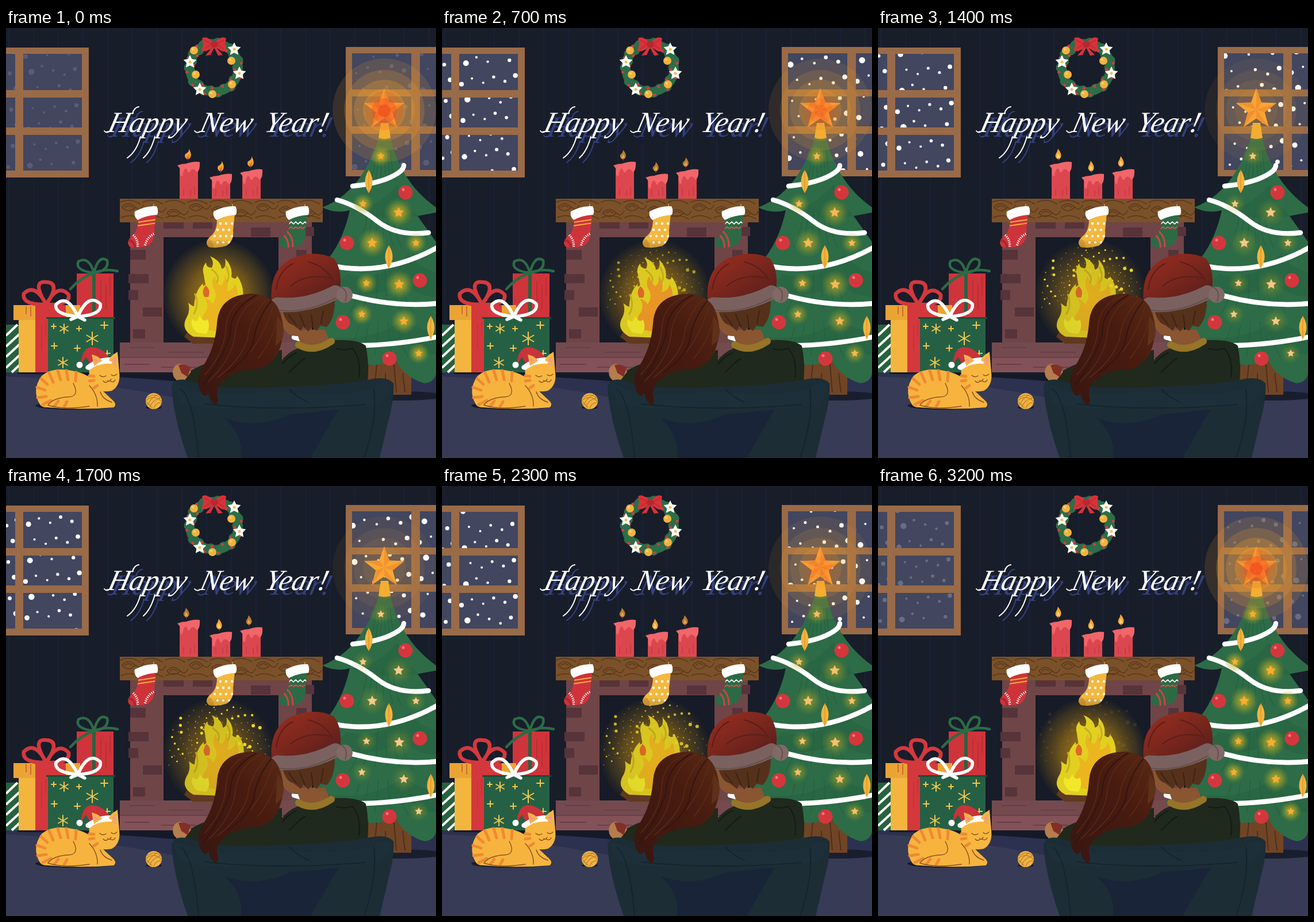
Animation, 748 px wide and 748 px high, one loop 3.3 s. Source, as an HTML page:

```html
<!DOCTYPE html>
<html lang="en">
<head>
<meta charset="utf-8">
<title>Happy New Year!</title>
<style>
html, body { margin: 0; width: 100%; height: 100%; overflow: hidden; background: #181d2a; }
svg { display: block; width: 100vw; height: 100vh; }
.line { fill: none; stroke-linecap: round; stroke-linejoin: round; }
text { font: italic 51px "Liberation Serif", "Noto Serif", serif; }
</style>
</head>
<body>
<svg viewBox="0 0 748 748">
<defs>
  <radialGradient id="fireGlow">
    <stop offset="0" stop-color="#e0a313" stop-opacity=".85"/>
    <stop offset=".55" stop-color="#a87a14" stop-opacity=".6"/>
    <stop offset=".85" stop-color="#74581a" stop-opacity=".35"/>
    <stop offset="1" stop-color="#594316" stop-opacity=".08"/>
  </radialGradient>
  <radialGradient id="starGlow">
    <stop offset="0" stop-color="#f5c21c" stop-opacity=".85"/>
    <stop offset=".5" stop-color="#c5b126" stop-opacity=".5"/>
    <stop offset="1" stop-color="#8a9433" stop-opacity="0"/>
  </radialGradient>
  <linearGradient id="hat" x1="0" y1="0" x2=".9" y2="1">
    <stop offset="0" stop-color="#9c2d20"/><stop offset=".5" stop-color="#7c271d"/><stop offset="1" stop-color="#541d1b"/>
  </linearGradient>
  <linearGradient id="hair" x1="1" y1="0" x2="0" y2="1">
    <stop offset="0" stop-color="#592a15"/><stop offset=".4" stop-color="#481b10"/><stop offset="1" stop-color="#381611"/>
  </linearGradient>
  <clipPath id="panes"><path d="M0 44H133V249H0zM601 43H748V248H601z"/></clipPath>
  <path id="sock" d="M230 329L261 324L258 352Q260 371 246 379Q230 384 216 381Q207 373 219 362Q231 353 230 329z"/>
  <path id="cuff" d="M224 319Q243 309 262 310Q266 317 263 325Q244 326 229 334Q222 328 224 319z" fill="#fff"/>
  <clipPath id="sockClip"><use href="#sock"/></clipPath>
</defs>

<rect width="748" height="748" fill="#181d2a"/>
<g id="wall" stroke="#1a2439" stroke-width="1.5"></g>
<path d="M0 598H748V748H0z" fill="#2c3150"/>
<path d="M0 606Q140 612 310 646H748V748H0z" fill="#373b55"/>
<path d="M20 598H300V615Q150 602 20 602z" fill="#151a28"/>

<!-- windows -->
<path d="M0 34H144V260H0zM591 33H748V258H591z" fill="#42465f"/>
<g id="snow" fill="#fff" clip-path="url(#panes)"></g>
<g fill="#996b48">
  <path d="M0 34H144V45H0zM132 34H144V260H132zM16 34H30V260H16zM0 108H144V121H0zM0 173H144V186H0zM0 248H144V260H0z"/>
  <path d="M591 33H748V44H591zM591 33H602V258H591zM705 33H720V258H705zM591 107H748V119H591zM591 171H748V184H591zM591 247H748V258H591z"/>
</g>

<!-- wreath -->
<g id="wreath"></g>
<path d="M362 26Q348 12 341 18Q345 28 340 39Q349 44 361 31L347 48L356 47L362 34L369 48L377 47L363 31Q376 44 384 39Q380 28 383 18Q375 12 362 26z" fill="#d8323a"/>
<path d="M345 21L358 28L345 36M379 21L366 28L379 36" class="line" stroke="#a92230"/>
<rect x="357" y="23" width="11" height="11" rx="4" fill="#b9262f"/>

<!-- greeting -->
<g id="greeting"></g>

<!-- fireplace -->
<path d="M216 338H532V547H216z" fill="#6f4548"/>
<path d="M274 364H474V547H274z" fill="#161b27"/>
<path d="M274 338H309V349H274zM325 338H359V349H325zM426 347H460V363H426zM216 386H243V403H216zM213 428H248V444H213zM213 456H230V473H213zM238 486H271V502H238zM221 524H242V540H221zM508 346H536V362H508zM505 386H523V402H505z" fill="#57333a"/>
<path d="M198 547H551V573H198z" fill="#744a4f"/>
<path d="M198 573H551V599H198z" fill="#835258"/>
<path d="M198 573H551M215 556H258M284 564H345M206 585H250M270 590H330" class="line" stroke="#633c43" stroke-width="1.5"/>
<rect x="198" y="297" width="353" height="41" fill="#7b512a"/>
<g id="wood" class="line" stroke="#593819" stroke-width="1.5"></g>
<g id="candles"></g>
<g id="flames"></g>
<g id="socks"></g>

<circle id="hearth" cx="370" cy="465" r="96" fill="url(#fireGlow)"/>
<g id="sparks" fill="#eed62a"></g>
<path d="M310 537L320 522L345 533L420 524V549H325z" fill="#60391f"/>
<g id="fire">
  <path d="M326 537Q303 524 314 504Q321 492 317 478Q324 484 327 484Q329 456 343 444Q341 452 347 446Q345 437 344 429Q340 417 348 408Q348 417 358 417Q363 408 355 397Q374 405 375 419Q384 418 381 401Q395 415 392 433Q400 440 402 431Q415 448 412 472L402 540z" fill="#e2d021"/>
  <path id="ember" d="M349 525Q334 510 347 494Q354 483 346 470Q355 472 359 480Q370 466 360 451Q357 439 363 430Q367 446 374 448Q381 442 380 428Q389 446 384 458Q397 456 398 444Q409 464 397 486L386 530z" fill="#f0a020"/>
  <path d="M345 468Q339 458 347 448Q357 455 352 468z" fill="#e0682a"/>
  <path d="M333 530Q319 519 324 506Q333 516 337 500Q342 513 351 507Q356 522 348 532z" fill="#f1e82a"/>
  <path d="M358 420Q373 431 367 442M383 415Q391 431 384 442M329 463Q336 482 327 497" class="line" stroke="#c6b021" stroke-width="3"/>
</g>

<!-- presents -->
<path d="M123 427H187V599H123z" fill="#cf343b"/>
<path d="M165 440V475M174 446V490M181 433V465" stroke="#a9262f"/>
<path d="M153 425V500" stroke="#27623f" stroke-width="6"/>
<path d="M153 426Q119 422 126 406Q144 396 153 426Q161 394 176 404Q180 422 153 426Q130 434 112 454M153 426Q173 418 194 423" class="line" stroke="#2c6b45" stroke-width="4.5"/>
<path d="M0 516H27V599H0z" fill="#27623f"/>
<path d="M0 535L20 516M0 554L25 531M0 572L26 548M0 591L27 566M10 599L27 583" stroke="#fff" stroke-width="4"/>
<path d="M22 504H123V599H22z" fill="#f3b53e"/>
<path d="M13 482H129V508H13z" fill="#eaa434"/>
<path d="M51 482H104V599H51z" fill="#d4383d"/>
<path d="M35 484V498M43 484V502M62 515V560M69 510V535" stroke="#b62e34"/>
<path d="M70 481Q27 482 31 462Q51 443 70 481Q44 439 70 442Q96 443 70 481Q90 443 109 464Q112 483 70 481" class="line" stroke="#d4383d" stroke-width="6.5"/>
<path d="M73 506H187V599H73z" fill="#266044"/>
<path d="M70 503H190V506H70z" fill="#1b4d36"/>
<path d="M125 502Q83 498 87 481Q106 461 125 502Q143 460 164 480Q168 499 125 502L113 507M125 502L137 508" class="line" stroke="#fff" stroke-width="5.5"/>
<g id="flakes" class="line" stroke="#f3c74d" stroke-width="2"></g>

<!-- cat and yarn -->
<ellipse cx="121" cy="657" rx="70" ry="7" fill="#171b2b"/>
<path d="M59 655Q44 630 62 605Q81 588 119 597Q145 602 154 618L183 645Q195 655 187 660Q130 665 72 660Q62 660 59 655z" fill="#f6b43f"/>
<path d="M145 590L148 567L164 574Q170 571 180 574L194 563L197 598Q200 622 184 631Q156 637 144 614z" fill="#f7b640"/>
<path d="M151 573L154 590L165 582zM191 570L181 582L193 589z" fill="#f39892"/>
<path d="M61 610L72 620M75 600L82 616M90 596L95 612M105 596L108 612M122 599L121 614M54 625L68 630M55 643L70 641M64 655L78 648M84 658L91 649M101 659L106 650M145 605L153 606M145 614L153 613M153 626L159 622" class="line" stroke="#f08a32" stroke-width="5"/>
<path d="M117 618Q130 643 104 642Q80 645 73 656Q100 665 145 658M145 622Q160 638 159 658M164 633Q168 646 184 651M163 604Q168 609 174 605M183 603Q188 607 193 602M177 613Q179 617 183 611M178 614Q173 619 169 614M181 614Q187 618 190 612" class="line" stroke="#8c5022" stroke-width="1.4"/>
<path d="M130 586Q132 557 148 555Q169 556 179 573Q160 580 150 590L139 572z" fill="#c9333a"/>
<path d="M139 588Q158 573 181 573Q189 582 182 584Q162 582 145 595Q136 594 139 588z" fill="#fff"/>
<path d="M149 568Q163 571 167 579L153 588zM194 564Q182 569 179 578L194 588z" fill="#f7b640"/>
<path d="M153 574L155 584L162 578zM191 570L184 578L192 583z" fill="#f39892"/>
<circle cx="128" cy="586" r="5.5" fill="#fff"/>
<ellipse cx="257" cy="660" rx="14" ry="3" fill="#171b2b"/>
<circle cx="257" cy="649" r="14" fill="#efb343"/>
<path d="M246 643Q258 634 268 643M244 648Q257 637 270 649M246 656Q253 642 264 638M250 660Q255 646 269 644M257 662Q260 651 270 652M244 650L254 660" class="line" stroke="#b97d29" stroke-width="1.2"/>

<!-- tree -->
<ellipse cx="682" cy="640" rx="82" ry="8" fill="#191e2e"/>
<path d="M632 560H705V638H627z" fill="#704526"/>
<path d="M645 585L640 635M660 600V635M675 585L679 634M690 600L694 634" stroke="#502f1d" stroke-width="2"/>
<path d="M649 190H668Q687 269 748 312V321L716 327L748 372V600Q746 616 728 618Q695 609 678 578Q645 590 622 584L570 562Q520 565 499 548Q550 525 572 470Q555 464 540 452L552 412Q586 374 598 317Q574 324 550 312Q619 286 649 190z" fill="#2d6c47"/>
<path d="M599 317Q648 337 716 327L706 315Q690 300 681 272Q640 319 599 317zM560 456Q645 475 690 444Q719 468 748 467V425Q718 418 700 393Q650 445 594 428zM522 552Q640 570 700 543Q721 569 748 568V530Q700 520 695 504Q635 550 550 536z" fill="#245c3d" opacity=".4"/>
<g id="needles" class="line" stroke="#27613f" stroke-width="1.3"></g>
<path d="M603 275Q655 270 681 253Q692 246 692 239M576 299Q612 309 647 337Q681 363 735 356M560 412Q655 435 752 381M588 462Q670 487 752 479M501 538Q600 567 752 537" class="line" stroke="#fff" stroke-width="8.5"/>
<g id="baubles"></g>
<g id="starlights"></g>
<g id="topGlow" fill="#f6a52a"></g>
<path d="M652 165H665L669 191Q658 195 648 191z" fill="#f3ae32"/>
<path id="topStar" fill="#f9a735"/>
<path id="facets" fill="#ed8528" opacity=".55"/>
<g id="topCore" fill="#f1431d"></g>

<!-- couple on the sofa -->
<path d="M308 606Q337 582 378 577L480 560V627H312z" fill="#20291b"/>
<path d="M291 605Q287 588 302 584Q315 587 322 598L309 615Q295 616 291 605z" fill="#b47d4b"/>
<path d="M300 586Q313 584 321 591L316 607L305 600z" fill="#822f28"/>
<path d="M462 625Q468 572 510 556Q540 573 572 543Q613 541 626 553Q633 590 628 622z" fill="#1f291d"/>
<path d="M481 584Q491 571 505 565M493 599Q513 578 520 575M604 559Q618 577 614 607M575 558Q590 562 603 557" class="line" stroke="#121b16" stroke-width="2"/>
<path d="M478 492H500L514 525H555L565 549Q538 566 513 551L508 536Q489 537 481 519z" fill="#8a5531"/>
<path d="M509 551Q535 566 566 545" class="line" stroke="#967429" stroke-width="12"/>
<path d="M480 488Q486 514 500 517L513 527L517 519L526 528L532 520L541 527L547 518L558 520Q572 506 572 474z" fill="#55311b"/>
<path d="M492 499L505 517M511 498L520 520M531 499L534 520M552 492L548 514" class="line" stroke="#3e2314" stroke-width="2"/>
<path d="M462 475Q457 419 499 400Q539 385 571 401Q588 426 579 465z" fill="url(#hat)"/>
<path d="M470 454Q475 421 499 410M526 407Q555 414 568 438M495 449Q522 426 563 435" class="line" stroke="#5a1f1b" stroke-width="2"/>
<path d="M472 481Q523 486 573 460" class="line" stroke="#7a6160" stroke-width="25"/>
<circle cx="589" cy="464" r="14" fill="#806966"/>
<path d="M585 452Q596 459 590 475M468 490Q519 499 573 470" class="line" stroke="#65504f" stroke-width="2"/>

<path d="M288 625Q290 609 313 612Q360 628 420 626Q560 625 640 610Q665 607 674 618Q676 645 665 684L650 748H316Q291 676 288 625z" fill="#1c2d36"/>
<path d="M292 622Q300 618 318 627Q360 646 462 632Q584 645 638 626Q663 610 671 624Q668 648 641 656Q560 666 475 657Q351 669 304 650z" fill="#1d3039"/>
<path d="M380 678Q433 700 494 672L578 664Q555 704 530 748H409Q414 711 380 678z" fill="#182238" opacity=".75"/>
<path d="M304 629Q326 642 335 748M640 628Q646 680 623 748M346 654Q470 668 626 655M493 628Q507 643 526 651" class="line" stroke="#15252e" stroke-width="2"/>

<path d="M367 514Q370 464 428 462Q469 465 477 497Q487 523 478 552Q470 583 440 593Q402 594 382 610Q366 620 367 638Q371 648 366 657Q352 648 353 635Q343 647 337 628Q330 608 343 588Q364 555 367 514z" fill="url(#hair)"/>
<path d="M472 501Q489 520 480 543L469 553z" fill="#5f311b"/>
<path d="M427 466Q382 480 382 529Q376 571 346 603M443 467Q402 488 398 537Q392 577 353 614M454 472Q425 501 420 541Q409 577 368 608M465 483Q450 532 425 564M472 506Q464 543 438 575" class="line" stroke="#5f2d18" stroke-width="1.3"/>
<path d="M435 465Q390 489 390 532Q377 577 343 621M461 475Q435 508 430 547Q419 577 385 599" class="line" stroke="#331510" stroke-width="2"/>
</svg>

<script>
const $ = id => document.getElementById(id);
const LOOP = 3300, TAU = Math.PI * 2;
const dot = (x, y, r, fill) => `<circle cx="${x}" cy="${y}" r="${r}"${fill ? ` fill="${fill}"` : ''}/>`;
const path = (d, attrs = '') => `<path d="${d}" ${attrs}/>`;
const times = (n, fn) => Array.from({ length: n }, (_, i) => fn(i)).join('');
const polar = (x, y, r, a) => [x + r * Math.cos(a), y + r * Math.sin(a)];
const star = (x, y, r, inner = r * .42) => 'M' + Array.from({ length: 10 }, (_, i) =>
  polar(x, y, i % 2 ? inner : r, i * TAU / 10 - TAU / 4).map(v => v.toFixed(1))).join('L') + 'z';
// Evenly scattered pairs in the unit square
const scatter = i => [(.5 + i * .75488) % 1, (.5 + i * .56984) % 1];

$('wall').innerHTML = times(18, i => path(`M${5 + i * 43} 0V598`));

// Wreath
$('wreath').innerHTML = `<circle cx="362" cy="69" r="42" fill="none" stroke="#2b6845" stroke-width="16"/>` +
  times(22, i => dot(...polar(362, 69, i % 2 ? 44 : 40, i * TAU / 22), 8.5, '#2d6d48')) +
  times(24, i => dot(...polar(362, 69, i % 2 ? 48 : 36, i * TAU / 24 + .1), 2.5, '#d83a3f')) +
  [[327, 39], [330, 81], [393, 98], [359, 115], [392, 57]].map(([x, y]) =>
    dot(x, y, 7, '#f2b33e') + dot(x - 2, y - 2, 2, '#f9d27a')).join('') +
  [[320, 59], [406, 79], [397, 37], [337, 107]].map(([x, y]) =>
    path(star(x, y, 12, 6), 'fill="#fff"') + dot(x, y, 2.5, '#efc14c')).join('');

// Greeting with pen flourishes
const words = [[175, 'Happy'], [335, 'New'], [448, 'Year!']];
const greeting = color => `<g fill="${color}">` + words.map(([x, word]) =>
  `<text transform="translate(${x} 181) skewX(-14)">${word}</text>`).join('') +
  path('M171 179Q175 184 181 179M220 149Q223 138 231 137M234 189Q227 215 211 226M259 189Q252 215 239 226M338 180Q332 184 328 179',
    `class="line" stroke="${color}" stroke-width="2"`) + '</g>';
$('greeting').innerHTML = `<g transform="translate(6 8)">${greeting('#33417f')}</g>` + greeting('#fff');

// Mantel grain and candles
$('wood').innerHTML = times(9, i => {
  const x = 202 + i * 39, y = 317 + (i % 3 - 1) * 5;
  return path(`M${x} ${y}q11 -13 23 0q-12 12 -23 0M${x + 5} ${y}q7 -6 13 0M${x - 3} 303q17 -8 34 3M${x - 2} 330q16 -8 34 2M${x + 24} ${y}q7 8 13 -4`);
});
const wicks = [[318, 233], [374, 254], [427, 246]];
$('candles').innerHTML = wicks.map(([x, y]) =>
  path(`M${x - 16} ${y + 8}H${x + 16}V297H${x - 16}z`, 'fill="#dc474f"') +
  path(`M${x - 20} ${y + 6}Q${x - 12} ${y + 3} ${x - 5} ${y + 3}Q${x + 9} ${y - 2} ${x + 19} ${y}Q${x + 20} ${y + 15} ${x + 14} ${y + 18}Q${x + 8} ${y + 9} ${x + 3} ${y + 15}Q${x} ${y + 23} ${x - 4} ${y + 12}Q${x - 9} ${y + 9} ${x - 11} ${y + 25}Q${x - 16} ${y + 27} ${x - 15} ${y + 12}z`, 'fill="#f0666a"') +
  path(`M${x - 9} 280v12M${x + 3} 282v10M${x + 10} 276v15`, 'stroke="#b7323f"')).join('');

// Stockings
const sock = (dx, color, trim) => `<g transform="translate(${dx} 0)">` +
  path('M257 311v-5', 'stroke="#c78734" stroke-width="2"') +
  `<use href="#sock" fill="${color}"/><g clip-path="url(#sockClip)">${trim}</g><use href="#cuff"/></g>`;
const band = (d, color, width = 2) => path(d, `class="line" stroke="${color}" stroke-width="${width}"`);
$('socks').innerHTML =
  sock(0, '#cf333a', band('M229 338L262 333M229 344L262 339', '#f0b13c') +
    path('M221 360Q232 371 228 383M242 378Q246 362 260 357', 'fill="none" stroke="#fff" stroke-width="4" stroke-dasharray="1.5 2"') +
    band('M210 372Q221 364 226 386', '#ac2732', 4)) +
  sock(137, '#f3b83f', times(20, i => dot(216 + i % 5 * 10 + (i / 5 | 0) % 2 * 5, 340 + (i / 5 | 0) * 11, 2.2, '#fff')) +
    path('M208 368Q225 363 225 385H209z', 'fill="#dc9d30"')) +
  sock(263, '#2c6a46', band('M229 341l4 -4l4 4l4 -4l4 4l4 -4l4 4l4 -4l4 4', '#fff', 1.6) +
    band('M229 349l4 -3l4 3l4 -3l4 3l4 -3l4 3l4 -3', '#e34a4c', 1.6) +
    band('M219 359Q230 369 228 385M226 354Q237 364 236 382', '#db3d42', 3));

$('flakes').innerHTML = [[101, 523, 8], [150, 540, 11], [99, 582, 9], [84, 553, 5], [171, 517, 6], [124, 557, 5], [83, 519, 4], [176, 566, 5], [127, 523, 4]]
  .map(([x, y, r]) => times(r > 7 ? 3 : 2, i => {
    const a = i * Math.PI / (r > 7 ? 3 : 2) + Math.PI / 2;
    return path(`M${polar(x, y, r, a)}L${polar(x, y, -r, a)}`);
  })).join('');

// Tree trimmings
$('needles').innerHTML = [[656, 205, 75], [650, 317, 78], [653, 422, 90], [656, 510, 80]].map(([x, y, h], row) =>
  times(6, i => {
    const s = (i - 2.5) * (5 + row * 4);
    return path(`M${x + s} ${y + Math.abs(i - 2.5) * 4}q${s * .15} ${h * .4} ${s * .7} ${h * .7}`);
  })).join('');
$('baubles').innerHTML = [[695, 286], [593, 374], [720, 439], [586, 512], [667, 575]].map(([x, y]) =>
  dot(x, y, 12.5, '#d3373d') + dot(x - 4, y - 5, 2.5, '#f0777a')).join('') +
  [[631, 267], [666, 398], [739, 521]].map(([x, y]) =>
    path(`M${x} ${y - 20}Q${x + 13} ${y} ${x} ${y + 20}Q${x - 13} ${y} ${x} ${y - 20}z`, 'fill="#f4b43b"') +
    path(`M${x} ${y - 20}v40`, 'stroke="#d48a2b"')).join('');
const lights = [[652, 223, 7], [621, 306, 7], [683, 321, 9.5], [637, 374, 9.5], [713, 374, 7], [627, 444, 7], [684, 446, 9.5], [619, 498, 7], [692, 510, 8.5], [718, 566, 7]];
$('starlights').innerHTML = `<g id="halos" fill="url(#starGlow)">${lights.map(([x, y, r]) => dot(x, y, r * 2.7)).join('')}</g>` +
  `<g id="lamps">${lights.map(([x, y, r]) => path(star(x, y, r, r * .48))).join('')}</g>`;
$('topGlow').innerHTML = [90, 70, 53, 37].map((r, i) => `<circle cx="658" cy="143" r="${r}" opacity="${.14 + i * .05}"/>`).join('');
$('topStar').setAttribute('d', star(658, 142, 37, 15.5));
$('facets').setAttribute('d', times(5, i => {
  const a = i * TAU / 5 - TAU / 4;
  return `M658 142L${polar(658, 142, 37, a)}L${polar(658, 142, 15.5, a + TAU / 10)}z`;
}));
$('topCore').innerHTML = [34, 22, 11].map((r, i) => `<circle cx="658" cy="144" r="${r}" opacity="${.16 + i * .2}"/>`).join('');

// Particles
const snow = Array.from({ length: 92 }, (_, i) => {
  const [u, v] = scatter(i >> 1);
  return { x: i % 2 ? 602 + u * 146 : u * 133, y: v * 226, r: 2 + 3.6 * (i * .381 % 1) ** 2 };
});
$('snow').innerHTML = snow.map(f => dot(f.x, 0, f.r)).join('');
const snowDots = [...$('snow').children];
$('sparks').innerHTML = times(105, i => {
  const [u, v] = scatter(i);
  return dot(...polar(0, 0, 42 + 56 * u, Math.PI * (.92 + 1.12 * v)), .7 + 3 * (i * .381 % 1) ** 4);
});

const mix = (a, b, k) => 'rgb(' + a.map((v, i) => Math.round(v + (b[i] - v) * k)) + ')';

function flame([x, y], i, phase) {
  const dim = phase === 1 || (phase === 5 && i !== 1);
  const lean = [3, 0, -2][phase % 3], h = dim ? 17 : 19;
  const cx = x - 3 + lean * .5 + (i === 1 ? 1 : 0), base = y - 4;
  const drop = (w, k) => `M${cx} ${base}Q${cx - w} ${base - 3} ${cx - w * .7} ${base - h * k * .5}Q${cx + lean} ${base - h * k * .7} ${cx + lean * .5} ${base - h * k}Q${cx + w * 1.4} ${base - h * k * .3} ${cx} ${base}z`;
  return path(drop(7, 1), `fill="${dim ? '#b67b34' : '#f6a534'}"`) +
    path(drop(3.5, .6), `fill="${dim ? '#e5a845' : phase % 3 ? '#f9d577' : '#ed792e'}"`) +
    path(`M${cx} ${base + 3}v-6`, 'stroke="#5e3029"');
}

function draw(now) {
  const ms = Math.floor(now % LOOP / 100) * 100, p = ms / LOOP;
  const phase = ms / 100 % 6, pulse = (1 + Math.cos(TAU * p)) / 2;

  const edge = Math.min(ms, LOOP - ms) / 1000;
  $('snow').setAttribute('opacity', Math.min(1, .12 + Math.max(0, edge - .05) * 1.8));
  snow.forEach((f, i) => snowDots[i].setAttribute('cy', 34 + (f.y + 226 * p) % 226));

  $('sparks').setAttribute('opacity', Math.sin(Math.PI * p));
  $('sparks').setAttribute('transform', `translate(370 ${467 - 5 * p}) scale(${.85 + .15 * p})`);
  $('hearth').setAttribute('opacity', .75 + .25 * pulse);

  const sway = [0, 1.4, -1][phase % 3], hot = phase === 1 || phase === 4;
  $('fire').setAttribute('transform', `translate(360 540) skewX(${sway}) scale(1 ${1 - Math.abs(sway) * .01}) translate(-360 -540)`);
  $('fire').setAttribute('opacity', .87 + .13 * pulse);
  $('ember').setAttribute('fill', hot ? '#ed9827' : '#ebb51f');
  $('flames').innerHTML = wicks.map((w, i) => flame(w, i, phase)).join('');

  $('halos').setAttribute('opacity', .35 + .6 * pulse);
  $('lamps').setAttribute('fill', mix([247, 202, 137], [250, 173, 49], pulse));
  $('topGlow').setAttribute('opacity', .42 + .58 * pulse);
  $('topCore').setAttribute('opacity', pulse);
}

const start = performance.now();
function tick() {
  draw(performance.now() - start);
  requestAnimationFrame(tick);
}
tick();
</script>
</body>
</html>
```
